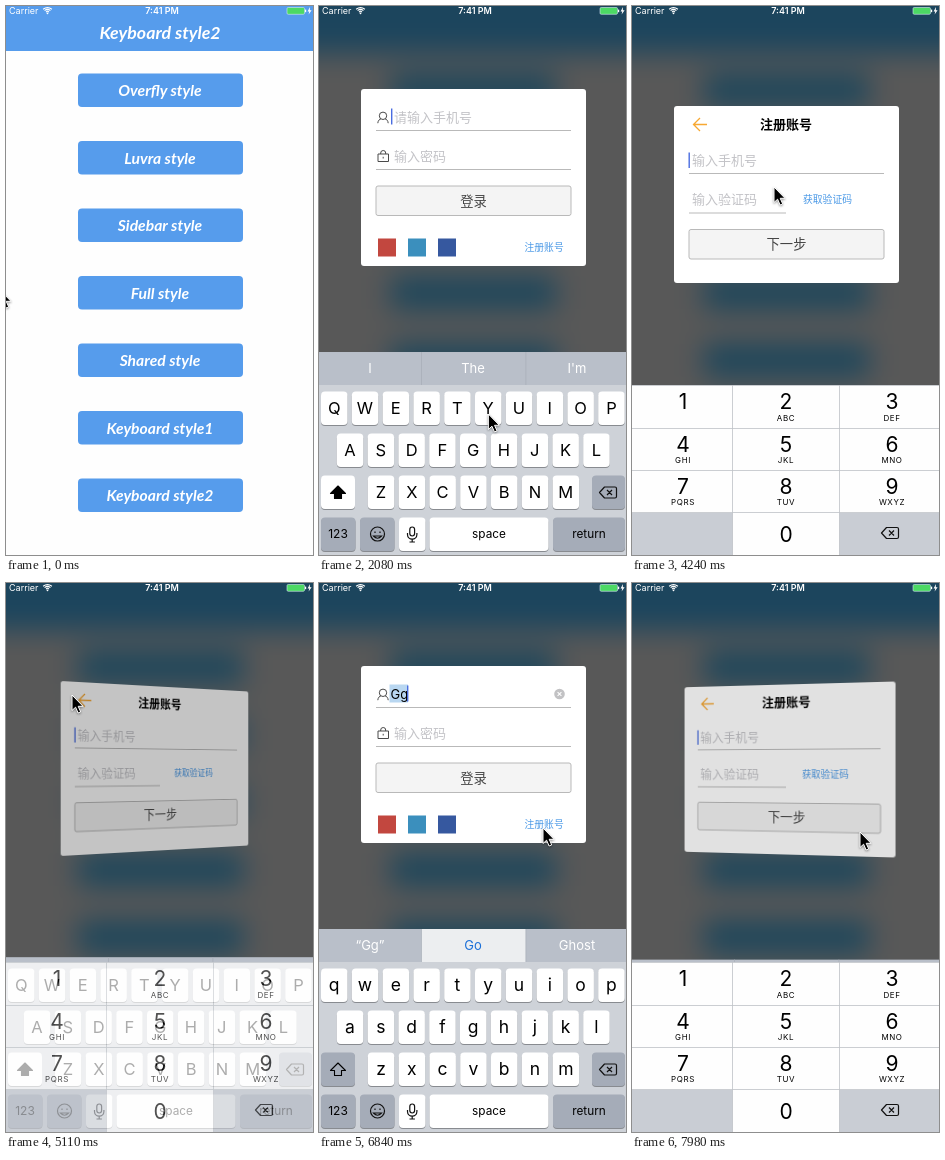
An HTML page that plays this animation: 307 by 549 pixels, repeating every 8000 ms.

```html
<!DOCTYPE html>
<html lang="zh-CN">
<head>
<meta charset="utf-8">
<title>Popup styles</title>
<style>
html, body { margin: 0; width: 100%; height: 100%; overflow: hidden; background: #fefefe; }
#stage { position: relative; width: 307px; height: 549px; overflow: hidden; }
#stage > svg, .card { position: absolute; left: 0; top: 0; }
svg { display: block; overflow: visible; font-family: Inter, "Noto Sans CJK SC", "Noto Sans CJK", sans-serif; }
.menu text { font: italic 700 15.7px Lato, sans-serif; fill: #fff; }
.menu .title { font-size: 17.8px; }
.glass { filter: blur(14px); }
.card { left: 42px; width: 225px; height: 177px; border-radius: 3px; background: #fff; overflow: hidden; }
.shade { position: absolute; inset: 0; background: #000; }
.hint { fill: #c3c3c7; }
.link { fill: #4998e6; }
.line { fill: #b9b9b9; }
.icon { fill: none; stroke: #4a4a4a; stroke-linejoin: round; }
.caret { fill: #4a6de0; }
</style>
</head>
<body>
<div id="stage"></div>
<script>
const W = 307, H = 549, LOOP = 8000;

// ---- drawing helpers ----
const attrs = o => Object.entries(o).map(([k, v]) => ` ${k}="${v}"`).join('');
const rect = (x, y, width, height, o = {}) => `<rect${attrs({ x, y, width, height, ...o })}/>`;
const path = (d, o = {}) => `<path${attrs({ d, ...o })}/>`;
const group = (body, o = {}) => `<g${attrs(o)}>${body}</g>`;
// y is the middle of the line
const text = (x, y, s, size, o = {}) =>
  `<text${attrs({ x, y: y + size * 0.37, 'font-size': size, ...o })}>${s}</text>`;
const mid = (x, y, s, size, o = {}) => text(x, y, s, size, { 'text-anchor': 'middle', ...o });
const svg = (body, o = {}, w = W, h = H) => `<svg${attrs({ width: w, height: h, ...o })}>${body}</svg>`;

// ---- menu and its blurred copy ----
const labels = ['Overfly', 'Luvra', 'Sidebar', 'Full', 'Shared', 'Keyboard', 'Keyboard']
  .map((s, i) => s + ' style' + (i > 4 ? i - 4 : ''));
const pills = fill => labels.map((_, i) => rect(72, 67.5 + 67.5 * i, 165, 33.5, { rx: 4, fill })).join('');
const menu = svg(
  rect(0, 0, W, 45, { fill: '#569cec' }) + pills('#569cec') +
  mid(154, 27, 'Keyboard style2', 17, { class: 'title' }) +
  labels.map((s, i) => mid(154, 84.5 + 67.5 * i, s, 15)).join(''), { class: 'menu' });
const glass = svg(rect(-80, -80, W + 160, H + 160, { fill: '#585858' }) +
  rect(-80, -80, W + 160, 127, { fill: '#1c455d' }) + pills('#1d465b'), { class: 'glass', id: 'glass' });

const arc = r => path(`M${41.5 - r} ${7.6 - r}Q41.5 ${6 - r * 1.35} ${41.5 + r} ${7.6 - r}`,
  { fill: 'none', stroke: '#fff', 'stroke-width': 1.1 });
const status = svg(
  text(3, 5, 'Carrier', 9) + arc(1.4) + arc(2.9) + arc(4.4) + '<circle cx="41.5" cy="7.3" r=".9"/>' +
  mid(156, 5, '7:41 PM', 9, { 'font-weight': 600 }) +
  rect(281, 1.5, 17.5, 6.8, { rx: 1.2, fill: '#4cd964', stroke: '#d5e6f5', 'stroke-width': 0.6 }) +
  rect(299, 3.6, 1.2, 2.6) + path('M304 1L301.6 5.4H303.3L302.6 8.6L305.6 4.2H303.8Z'), { fill: '#fff' });

// ---- cards ----
const button = (y, s) => rect(15, y, 195, 29.5, { rx: 2, fill: '#f4f4f4', stroke: '#b9b9b9' }) +
  mid(112.5, y + 14.6, s, 13.3, { fill: '#444' });
const square = (x, fill) => rect(x, 149.5, 18, 18, { fill });
const login =
  '<circle class="icon" cx="22" cy="26.8" r="3.7"/>' +
  path('M16.8 34.2C17 31.4 18.6 30.2 20 29.8M24 29.8C25.6 30.3 27 31.5 27.2 34.2', { class: 'icon' }) +
  rect(17, 65, 10.5, 7.5, { class: 'icon' }) +
  path('M19.7 65V64a2.5 2.5 0 0 1 5 0V65M22.2 67.8V69.5', { class: 'icon' }) +
  rect(15, 41, 195, 1, { class: 'line' }) + rect(15, 80, 195, 1, { class: 'line' }) +
  text(33, 28, '请输入手机号', 13, { class: 'hint', id: 'phoneHint' }) +
  text(33, 67, '输入密码', 13, { class: 'hint' }) +
  group(rect(28.5, 18.5, 18.5, 18, { fill: '#b9d7f1', id: 'mark' }) + text(29.5, 28, '', 13, { id: 'typed' }) +
    '<circle cx="198.5" cy="28" r="5.3" fill="#c2c2c4"/>' +
    path('M196.6 26.1l3.8 3.8m0-3.8l-3.8 3.8', { stroke: '#fff', 'stroke-width': 1.1 }), { id: 'entry' }) +
  rect(30, 19.5, 1.4, 16, { class: 'caret', id: 'caretA' }) + button(97, '登录') +
  square(17, '#c2473f') + square(47, '#3b8fbd') + square(77, '#36589f') +
  text(163.5, 158.5, '注册账号', 9.8, { class: 'link', id: 'signup' });
const register =
  path('M33 18.5H19.5M26 12L19.5 18.5L26 25', { fill: 'none', stroke: '#f7a832', 'stroke-width': 1.3 }) +
  mid(112, 18.5, '注册账号', 13, { 'font-weight': 700 }) +
  text(18, 54, '输入手机号', 13, { class: 'hint' }) + text(18, 93, '输入验证码', 13, { class: 'hint' }) +
  rect(15, 67, 195, 1, { class: 'line' }) + rect(15, 106.5, 97, 1, { class: 'line' }) +
  text(129, 93, '获取验证码', 9.8, { class: 'link' }) +
  rect(14.5, 46.5, 1.4, 15.5, { class: 'caret', id: 'caretB' }) + button(123.5, '下一步');
const card = (id, body) => `<div class="card" id="${id}">${svg(body, {}, 225, 177)}<div class="shade"></div></div>`;

// ---- keyboards ----
const GREY = '#a5acb8', PANEL = '#ced2d8';
const key = (x, y, w, fill = '#fff', o = {}) =>
  rect(x, y + 1, w, 33.5, { rx: 4, fill: '#888b90' }) + rect(x, y, w, 33.5, { rx: 4, fill, ...o });
const rows = ['QWERTYUIOP', 'ASDFGHJKL', 'ZXCVBNM'];
const starts = [15.2, 31, 62];
const eachKey = f => rows.map((r, j) => [...r].map((c, i) => f(starts[j] + 30.8 * i, 385.5 + 42 * j, c)).join('')).join('');
const letters = (lower, id) => group(eachKey((x, y, c) =>
  mid(x, y + 16.7 - (lower ? 1 : 0), lower ? c.toLowerCase() : c, lower ? 17.5 : 16.5)), { id });
const erase = (x, y) => path(`M${x - 8.5} ${y}l5-5.5h10.5q1.5 0 1.5 1.5v8q0 1.5-1.5 1.5h-10.5z` +
  `M${x - 1} ${y - 2.5}l5 5m0-5l-5 5`, { fill: 'none', stroke: '#111', 'stroke-width': 1.2, 'stroke-linejoin': 'round' });
const face = '<circle cx="58.5" cy="528" r="7"/><path d="M54.5 530q4 4.5 8 0zM56 525.5v1.5M61 525.5v1.5"/>';
const mic = '<rect x="90.8" y="521" width="4.8" height="9" rx="2.4"/>' +
  '<path d="M88.5 527v1.5a4.7 4.7 0 0 0 9.4 0V527M93.2 533v3M90.5 536h5.4"/>';
const qwerty = rect(0, 379, W, 170, { fill: PANEL }) + eachKey((x, y) => key(x - 13.2, y, 26.5)) +
  letters(false, 'upper') + letters(true, 'lower') +
  key(2, 469.5, 34, '#fff', { id: 'shiftKey' }) +
  path('M19 480l-7.5 7.5h4v5h7v-5h4z', { id: 'shift', stroke: '#000', 'stroke-width': 1.1, 'stroke-linejoin': 'round' }) +
  key(273, 469.5, 33, GREY) + erase(289, 486.5) +
  key(2, 511.5, 34.5, GREY) + mid(19, 528, '123', 12) + key(41, 511.5, 34.5, GREY) +
  key(80, 511.5, 26.5) + group(face + mic, { fill: 'none', stroke: '#111', 'stroke-width': 1.2 }) +
  key(110.5, 511.5, 119) + mid(170, 527.5, 'space', 11.8) + key(234, 511.5, 72, GREY) + mid(270, 527.5, 'return', 11.8);

const cols = [51, 154, 260];
const tags = ['', 'ABC', 'DEF', 'GHI', 'JKL', 'MNO', 'PQRS', 'TUV', 'WXYZ'];
const numpad = rect(0, 379, W, 170, { fill: '#fefefe' }) +
  rect(0, 507, 100.5, 42, { fill: '#c9cdd4' }) + rect(207.5, 507, 100, 42, { fill: '#c9cdd4' }) +
  [379, 422, 464, 506].map(y => rect(0, y, W, 0.8, { fill: '#bfc2c7' })).join('') +
  [100, 207].map(x => rect(x, 379, 0.8, 170, { fill: '#bfc2c7' })).join('') +
  tags.map((s, i) => {
    const x = cols[i % 3], y = 395.5 + 42.3 * Math.floor(i / 3);
    return mid(x, y, i + 1, 21) + mid(x, y + 16.3, s, 8, { 'letter-spacing': 0.6 });
  }).join('') + mid(154, 528, 0, 21) + erase(258, 527);
const words = [51, 154, 258].map((x, i) => mid(x, 362, '', 13, { id: 'word' + i })).join('');
const bar = group(rect(0, 346, W, 34, { fill: '#b9bfc9' }) +
  rect(102, 346, 105, 34, { fill: '#eceef0', id: 'pick' }) +
  rect(102, 346, 0.8, 34, { fill: '#a9afb9' }) + rect(206.5, 346, 0.8, 34, { fill: '#a9afb9' }) +
  group(words, { fill: '#fff' }), { id: 'bar' });
const keyboard = svg(group(bar + qwerty + group(numpad, { id: 'numpad' }), { id: 'keys' }));

const mouse = svg(path('M0 0V15.5L3.6 12.2L6.1 18L8.7 16.9L6.2 11.3H11Z',
  { fill: '#000', stroke: '#fff', 'stroke-width': 1, id: 'mouse', style: 'filter:drop-shadow(0 1px 1px #0006)' }));

document.getElementById('stage').innerHTML =
  menu + glass + card('login', login) + card('register', register) + keyboard + status + mouse;
const el = {};
document.querySelectorAll('[id]').forEach(e => { el[e.id] = e; });

// ---- timing ----
// The picture advances in bursts: [first, last, steps]
const beats = [[0], [60, 690, 12], [1500, 1790, 4], [1940], [2080, 2850, 12], [2910, 3070, 4],
  [3310, 3600, 5], [3810, 3920, 2], [4130, 4760, 12], [4240], [4990, 5280, 6], [5460, 5580, 2],
  [5730, 6140, 8], [6380, 7130, 12], [6840], [7190, 7250, 2], [7430, 7980, 9]]
  .flatMap(([a, b = a, n = 1]) => Array.from({ length: n }, (_, i) => i ? a + (b - a) * i / (n - 1) : a))
  .sort((a, b) => a - b);
const snap = t => beats.filter(b => b <= t).pop();

const clamp = k => Math.max(0, Math.min(1, k));
const ease = k => (1 - Math.cos(Math.PI * clamp(k))) / 2;
const within = (t, spans) => spans.some(([a, b]) => t >= a && t < b);

const OPEN = 1500, RISE = 600, TURN = 665;
const turns = [3270, 4940, 7430];
const route = [[0, -6, 284], [690, 169, 409], [2040, 169, 409], [2850, 228, 241], [3060, 233, 243],
  [3300, 233, 243], [3900, 244, 252], [4100, 244, 252], [4240, 142, 181], [4760, 66, 112], [5200, 66, 112],
  [5580, 112, 139], [5690, 112, 139], [6140, 155, 445], [6500, 155, 445], [6840, 224, 245],
  [7400, 224, 245], [7900, 228, 249]];
const blinks = [[0, 1580], [2500, 2960], [4300, 4720], [7200, 7430]];
const presses = [[3020, 3270], [7190, 7430]];

const show = (e, on) => { e.style.display = on ? '' : 'none'; };
const move = (e, x, y) => e.setAttribute('transform', `translate(${x} ${y})`);

function drawMouse(t) {
  const i = route.findLastIndex(p => p[0] <= t);
  const [a, x, y] = route[i], [b, u, v] = route[i + 1] || [a + 1, x, y];
  const k = ease((t - a) / (b - a));
  move(el.mouse, x + (u - x) * k, y + (v - y) * k);
}

function drawCards(t, f, toRegister, open) {
  const amount = toRegister ? f : 1 - f;
  const rise = 1 - (1 - clamp((t - OPEN) / RISE)) ** 3;
  const front = toRegister === (f > 0.5);
  const angle = f < 0.5 ? 180 * f : 180 * f - 180;
  const depth = Math.abs(Math.sin(angle * Math.PI / 180));
  const y = 190 - 107 * rise + 16.5 * amount;
  for (const [e, on] of [[el.login, !front], [el.register, front]]) {
    show(e, open && on);
    e.style.top = y + 'px';
    e.style.transform = depth < 1e-4 ? 'none'
      : `perspective(720px) translateZ(${-130 * depth}px) rotateY(${angle}deg)`;
    e.lastChild.style.opacity = 0.52 * depth;
  }
  show(el.keys, open);
  move(el.keys, 0, 203 * (1 - rise));
  move(el.bar, 0, 33 * amount);
  const fade = clamp(f * 2.2);
  el.numpad.style.opacity = toRegister ? fade : 1 - fade;
}

function drawEntry(t) {
  const typed = t < 6380 ? '' : t < 6510 ? 'G' : 'Gg';
  const lower = typed !== '', done = typed === 'Gg';
  show(el.phoneHint, !lower);
  show(el.entry, lower);
  show(el.mark, done);
  el.typed.textContent = typed;
  el.caretA.setAttribute('x', done ? 46 : lower ? 40 : 30);
  show(el.caretA, !within(t, blinks));
  show(el.caretB, !within(t, blinks));
  el.signup.style.opacity = within(t, presses) ? 0.4 : 1;
  show(el.upper, !lower);
  show(el.lower, lower);
  el.shiftKey.setAttribute('fill', lower ? GREY : '#fff');
  el.shift.setAttribute('fill', lower ? 'none' : '#000');
  const offer = done && t < turns[2];
  show(el.pick, offer);
  (offer ? ['“Gg”', 'Go', 'Ghost'] : ['I', 'The', 'I\'m']).forEach((s, i) => { el['word' + i].textContent = s; });
  el.word1.setAttribute('fill', offer ? '#1a6fd8' : '#fff');
}

function draw(now) {
  const t = snap(now % LOOP);
  const open = t >= OPEN;
  const i = turns.findLastIndex(s => s <= t);
  const f = i < 0 ? 0 : ease((t - turns[i]) / TURN);
  show(el.glass, open);
  drawCards(t, f, i % 2 === 0 || i < 0, open);
  drawEntry(t);
  drawMouse(t);
}

const begin = performance.now();
function tick() {
  draw(performance.now() - begin);
  requestAnimationFrame(tick);
}
tick();
</script>
</body>
</html>
```
